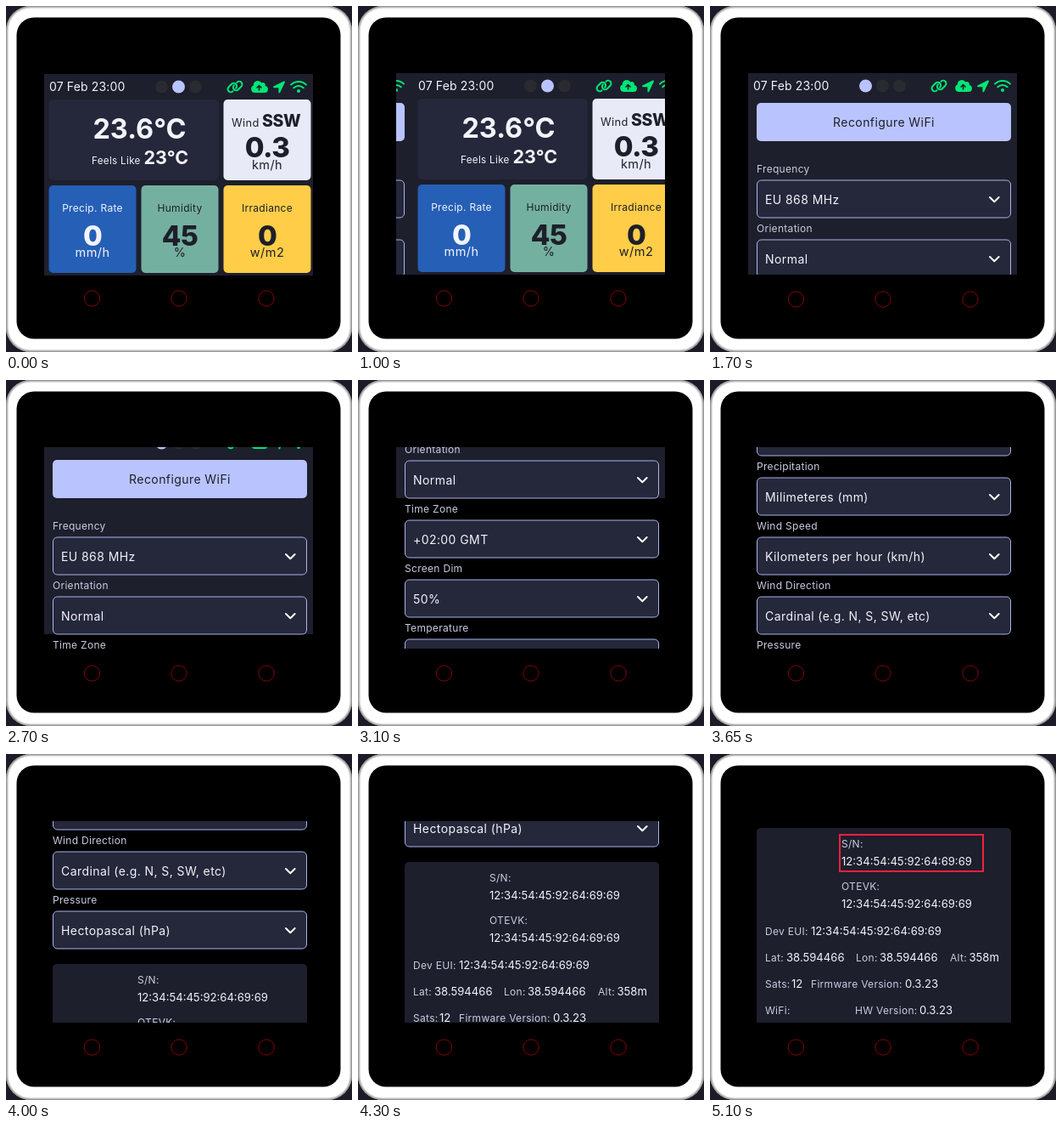
These frames come from a looping animation (408x407 px, 8100 ms). An HTML page:

```html
<!DOCTYPE html>
<html lang="en">
<head>
<meta charset="utf-8">
<title>Weather display</title>
<style>
  html, body { margin: 0; width: 100%; height: 100%; overflow: hidden; background: #1c1b27; }
  svg { display: block; width: 100%; height: 100%; }
  text { font: 14px Inter, sans-serif; letter-spacing: .03em; fill: #f2f3fb; }
  .mid { text-anchor: middle; }
  .small { font-size: 12px; letter-spacing: .025em; }
  .label { fill: #c9cce2; }
  .value { font-size: 13.1px; letter-spacing: 0; }
  .clock { letter-spacing: .01em; }
  .unit { font-size: 14.5px; }
  .bold { font-weight: 700; letter-spacing: 0; }
  .big { font-weight: 800; font-size: 33px; letter-spacing: -.02em; }
  .dark { fill: #1d1f2a; }
  .icon { fill: none; stroke: #00e676; stroke-width: 2; stroke-linecap: round; stroke-linejoin: round; }
  .solid { fill: #00e676; stroke: none; }
</style>
</head>
<body>
<svg viewBox="0 0 408 407">
  <defs>
    <clipPath id="window"><rect x="45" y="79" width="317" height="237"/></clipPath>
    <clipPath id="body"><rect width="408" height="407" rx="29"/></clipPath>
  </defs>
  <g clip-path="url(#body)">
    <rect width="408" height="407" fill="#fff"/>
    <rect width="408" height="407" rx="29" fill="none" stroke="#777" stroke-width="3" style="filter:blur(1.2px)"/>
  </g>
  <rect x="12.5" y="13.5" width="382" height="378" rx="20.5"/>
  <g id="screen">
    <g clip-path="url(#window)">
      <g id="home"></g>
      <g id="settings"></g>
    </g>
  </g>
  <rect id="highlight" x="153" y="95" width="169" height="43" fill="none" stroke="#f5203f" stroke-width="2"/>
  <g id="buttons" fill="none" stroke="#850407">
    <circle cx="101.5" cy="344" r="9.2"/>
    <circle cx="204" cy="344" r="9.2"/>
    <circle cx="307" cy="344" r="9.2"/>
  </g>
</svg>
<script>
const $ = id => document.getElementById(id);
const PANEL = '#1e1f2c', CARD = '#25273a', ACCENT = '#b9c4ff';

const text = (x, y, str, cls = '', size) =>
  `<text x="${x}" y="${y}" class="${cls}"${size ? ` style="font-size:${size}px"` : ''}>${str}</text>`;
const card = (x, y, w, h, fill, stroke = 'none') =>
  `<rect x="${x}" y="${y}" width="${w}" height="${h}" rx="5" fill="${fill}" stroke="${stroke}"/>`;

const statusIcons = `
  <g class="icon">
    <path transform="translate(260 86)" d="M12.5 2.7A3.5 3.5 0 0 1 17.4 7.7L13.9 11.2A3.5 3.5 0 0 1 8.9 6.2
      M7.5 13.3A3.5 3.5 0 0 1 2.6 8.3L6.1 4.8A3.5 3.5 0 0 1 11.1 9.8"/>
    <g transform="translate(289 86)">
      <path class="solid" d="M4.5 15A4.5 4.5 0 0 1 2.8 6.4A5.2 5.2 0 0 1 12.4 3.4A3.1 3.1 0 0 1 16.8 7.1A4 4 0 0 1 16 15Z"/>
      <path d="M9.5 12V7M7 9L9.5 6.5L12 9" stroke="${PANEL}" stroke-width="1.6"/>
    </g>
    <path class="solid" d="M315.4 93.4L327.4 87.6Q329.4 87 328.8 89L323.2 100.8Q321.6 102.4 321.4 100.4V95.2H316Q314 94.6 315.4 93.4Z"/>
    <g transform="translate(335 86)">
      <path d="M1 5.6A13 13 0 0 1 19 5.6M4.3 9.2A8.2 8.2 0 0 1 15.7 9.2"/>
      <circle class="solid" cx="10" cy="13" r="2"/>
    </g>
  </g>`;

const pageBase = active =>
  `<rect x="45" y="79" width="320" height="240" fill="${PANEL}"/>` +
  text(51, 99, '07 Feb 23:00', 'clock') +
  [183.5, 203.5, 223.5].map((x, i) =>
    `<circle cx="${x}" cy="94" r="7.5" fill="${i === active ? ACCENT : '#2a2a31'}"/>`).join('') +
  statusIcons;

const tile = (x, w, fill, name, value, unit, tone) => {
  const mid = x + w / 2;
  return card(x, 210, w, 103, fill) +
    text(mid, 241, name, `mid small ${tone}`) +
    text(mid, 280.5, value, `mid big ${tone}`) +
    text(mid, 294, unit, `mid unit ${tone}`);
};

$('home').innerHTML = pageBase(1) +
  card(50.5, 109, 200, 95, CARD) +
  text(157.5, 155, '23.6°C', 'mid bold', 32.5) +
  text(101, 184.5, 'Feels Like', 'small', 11.7) +
  text(162.5, 185, '23°C', 'bold', 21.5) +
  card(256.5, 109, 103, 95, '#e8eaf8') +
  text(266, 141, 'Wind', 'dark', 12.8) +
  text(302, 140.5, 'SSW', 'big dark', 19.5) +
  text(308, 177, '0.3', 'mid big dark') +
  text(308, 190.5, 'km/h', 'mid unit dark') +
  tile(50.5, 103, '#255fb6', 'Precip. Rate', '0', 'mm/h', '') +
  tile(159.5, 91, '#74b0a0', 'Humidity', '45', '%', 'dark') +
  tile(256.5, 103, '#ffcd48', 'Irradiance', '0', 'w/m2', 'dark');

const fields = [
  ['Frequency', 'EU 868 MHz'],
  ['Orientation', 'Normal'],
  ['Time Zone', '+02:00 GMT'],
  ['Screen Dim', '50%'],
  ['Temperature', 'Celsius (°C)'],
  ['Precipitation', 'Milimeteres (mm)'],
  ['Wind Speed', 'Kilometers per hour (km/h)'],
  ['Wind Direction', 'Cardinal (e.g. N, S, SW, etc)'],
  ['Pressure', 'Hectopascal (hPa)'],
];
const field = ([name, value], i) => `<g transform="translate(0 ${i * 70})">` +
  text(55, 196, name, 'small label') +
  card(55.5, 205, 299, 44, CARD, '#aab4ee') +
  text(65, 232.5, value) +
  `<path d="M330 225L335.3 230.3L340.6 225" fill="none" stroke="#fff" stroke-width="2"
    stroke-linecap="round" stroke-linejoin="round"/></g>`;

const serial = '12:34:54:45:92:64:69:69';
const label = (x, y, str) => text(x, y, str, 'small label');
const value = (x, y, str) => text(x, y, str, 'value');
const device = '<g transform="translate(0 740)">' +
  card(55, 87, 300, 240, PANEL) +
  label(155, 110, 'S/N:') + value(155, 131, serial) +
  label(155, 160, 'OTEVK:') + value(155, 181, serial) +
  label(65, 213, 'Dev EUI:') + value(119, 213, serial) +
  label(65, 244, 'Lat:') + value(90, 244, '38.594466') +
  label(172, 244, 'Lon:') + value(200, 244, '38.594466') +
  label(283, 244, 'Alt:') + value(305.5, 244, '358m') +
  label(65, 275, 'Sats:') + value(96, 275, '12') +
  label(119, 275, 'Firmware Version:') + value(230, 275, '0.3.23') +
  label(65, 306, 'WiFi:') +
  label(171, 306, 'HW Version:') + value(247, 306, '0.3.23') + '</g>';

$('settings').innerHTML = pageBase(0) +
  card(55, 114, 300, 45, ACCENT) +
  text(205, 142, 'Reconfigure WiFi', 'mid dark') +
  fields.map(field).join('') + device;

const LOOP = 8100, STEP = 50, PAGE = 320;
const stepsSince = (t, start) => Math.floor((t - start) / STEP);

function slideAt(t) {
  if (t < 1000) return 0;
  return Math.min(PAGE, 20 + stepsSince(t, 1000) * 300 / 14);
}

// Steady scroll with one skipped stretch
function scrollAt(t) {
  if (t < 2700) return 0;
  return 20 * (stepsSince(Math.min(t, 4400), 2700) + 1) + (t >= 3400 ? 40 : 0);
}

const move = (id, x, y) => $(id).setAttribute('transform', `translate(${x} ${y})`);

function render(t) {
  const slide = slideAt(t);
  move('screen', 0, t < 1000 ? 1 : 0);
  move('home', slide, 0);
  move('settings', slide - PAGE, -scrollAt(t));
  move('buttons', 0, t < 1700 ? 0 : 1);
  const fade = (stepsSince(t, 4900) + 1) / 5;
  $('highlight').setAttribute('opacity', Math.max(0, Math.min(1, fade)));
}

const start = performance.now();
function tick() {
  render((performance.now() - start) % LOOP);
  requestAnimationFrame(tick);
}
tick();
</script>
</body>
</html>
```
